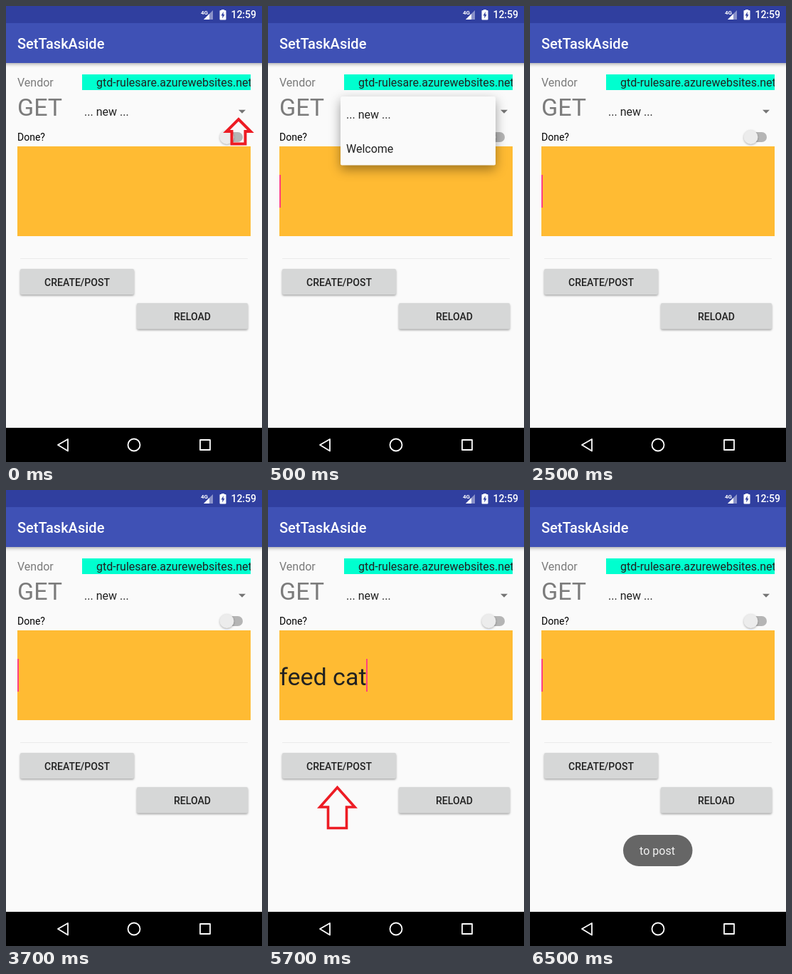
Write an HTML page with a canvas that moves like this. It is 360x640 px and loops after 8 s.

```html
<!DOCTYPE html>
<html lang="en">
<head>
<meta charset="utf-8">
<title>Task app</title>
<style>
  html, body { margin: 0; width: 100%; height: 100%; overflow: hidden; background: #fafafa; }
  canvas { display: block; width: 360px; height: 640px; }
</style>
</head>
<body>
<canvas id="stage"></canvas>
<script>
const W = 360, H = 640, LOOP = 8000;
const canvas = document.getElementById('stage');
const ctx = canvas.getContext('2d');
const dpr = window.devicePixelRatio || 1;
canvas.width = W * dpr;
canvas.height = H * dpr;
ctx.scale(dpr, dpr);

const INK = '#212121', GREY = '#7b7b7b', PINK = '#ff4081', RED = '#ed1c24';

function rect(x, y, w, h, color) {
  ctx.fillStyle = color;
  ctx.fillRect(x, y, w, h);
}

function text(str, x, y, size, color, weight = 400, align = 'left') {
  ctx.font = `${weight} ${size}px Roboto, sans-serif`;
  ctx.textAlign = align;
  ctx.fillStyle = color;
  ctx.fillText(str, x, y);
}

function poly(points) {
  ctx.beginPath();
  points.forEach(([x, y]) => ctx.lineTo(x, y));
  ctx.closePath();
}

function fillPoly(points, color) {
  poly(points);
  ctx.fillStyle = color;
  ctx.fill();
}

function strokePoly(points, color, width) {
  poly(points);
  ctx.strokeStyle = color;
  ctx.lineWidth = width;
  ctx.stroke();
}

function round(x, y, w, h, r, color) {
  ctx.beginPath();
  ctx.roundRect(x, y, w, h, r);
  ctx.fillStyle = color;
  ctx.fill();
}

function withShadow(alpha, blur, dy, draw) {
  ctx.save();
  ctx.shadowColor = `rgba(0,0,0,${alpha})`;
  ctx.shadowBlur = blur * dpr;
  ctx.shadowOffsetY = dy * dpr;
  draw();
  ctx.restore();
}

function statusBar() {
  rect(0, 0, W, 24, '#303f9f');
  text('4G', 274, 12, 8, '#fff', 700);
  fillPoly([[291, 6], [291, 19], [278, 19]], '#8a92c9');
  fillPoly([[286, 11], [286, 19], [278, 19]], '#fff');
  rect(303, 5, 4, 2, '#fff');
  round(300.5, 6, 9, 13.5, 1, '#fff');
  fillPoly([[305.8, 8], [302.5, 13.5], [304.5, 13.5], [304.2, 17.5], [307.5, 12], [305.6, 12]], '#303f9f');
  text('12:59', 352, 17, 14, '#fff', 500, 'right');
}

function appBar() {
  withShadow(0.35, 5, 1.5, () => rect(-10, 24, W + 20, 56, '#3f51b5'));
  text('SetTaskAside', 16, 60, 20, '#fff', 500);
}

function navBar() {
  rect(0, 592, W, 48, '#000');
  ctx.lineJoin = 'round';
  strokePoly([[73, 616], [87, 608], [87, 624.5]], '#fff', 1.8);
  ctx.beginPath();
  ctx.arc(180, 616, 8.5, 0, Math.PI * 2);
  ctx.stroke();
  strokePoly([[273, 609], [287, 609], [287, 623], [273, 623]], '#fff', 1.8);
  ctx.lineJoin = 'miter';
}

function toggle() {
  round(304, 177, 29, 14, 7, '#b5b5b5');
  withShadow(0.3, 3, 1, () => round(300.5, 174, 20, 20, 10, '#ececec'));
}

function button(label, x, y, w, h) {
  withShadow(0.35, 3, 1.5, () => round(x, y, w, h, 2, '#d6d7d7'));
  text(label, x + w / 2, y + 23.5, 14, INK, 500, 'center');
}

function form() {
  text('Vendor', 16, 113, 16, GREY);
  rect(107, 96, 237, 22, '#00ffcf');
  ctx.save();
  ctx.beginPath();
  ctx.rect(107, 96, 237, 22);
  ctx.clip();
  text('gtd-rulesare.azurewebsites.net', 127, 113, 16, INK);
  ctx.restore();
  text('GET', 16, 154, 34, GREY);
  text('... new ...', 110, 154, 16, INK);
  fillPoly([[327, 145.8], [337, 145.8], [332, 150.8]], '#757575');
  text('Done?', 16, 189, 14, '#000');
  toggle();
  rect(16, 197, 328, 126, '#ffbb33');
  rect(20, 354, 320, 1, '#ebebeb');
  button('CREATE/POST', 20, 369, 160, 36);
  button('RELOAD', 184, 417, 156, 36.5);
}

// Outlined arrow pointing up; (x, y) is the tip.
function arrow(x, y, half, neck, headH, fullH, width) {
  strokePoly([
    [x, y], [x + half, y + headH], [x + neck, y + headH], [x + neck, y + fullH],
    [x - neck, y + fullH], [x - neck, y + headH], [x - half, y + headH]
  ], RED, width);
}

function cursor(x) {
  rect(x, 237, 2, 46, PINK);
}

function menu() {
  withShadow(0.38, 16, 6, () => round(102, 127, 218, 96.5, 2, '#fafafa'));
  text('... new ...', 110, 158, 16, INK);
  text('Welcome', 110, 206, 16, INK);
}

function toast() {
  round(131, 484, 97.5, 44, 22, '#666');
  ctx.fontStretch = 'condensed';
  text('to post', 179, 512, 16, '#f2f2f2', 400, 'center');
  ctx.fontStretch = 'normal';
}

const scenes = [
  { until: 500, draw() { arrow(327, 159, 17, 9.5, 17, 34.5, 4); } },
  { until: 2500, draw() { cursor(16); menu(); } },
  { until: 4500, draw() { cursor(16); } },
  { until: 6500, draw() {
    text('feed cat', 16, 274, 34, INK);
    cursor(138);
    arrow(97.5, 417.5, 24.5, 13, 27.5, 57, 3.6);
  } },
  { until: LOOP, draw() { cursor(16); toast(); } }
];

function frame(now) {
  const t = (now - start) % LOOP;
  rect(0, 0, W, H, '#fafafa');
  form();
  appBar();
  statusBar();
  navBar();
  scenes.find(s => t < s.until).draw();
  requestAnimationFrame(() => frame(performance.now()));
}

const start = performance.now();
frame(start);
</script>
</body>
</html>
```
